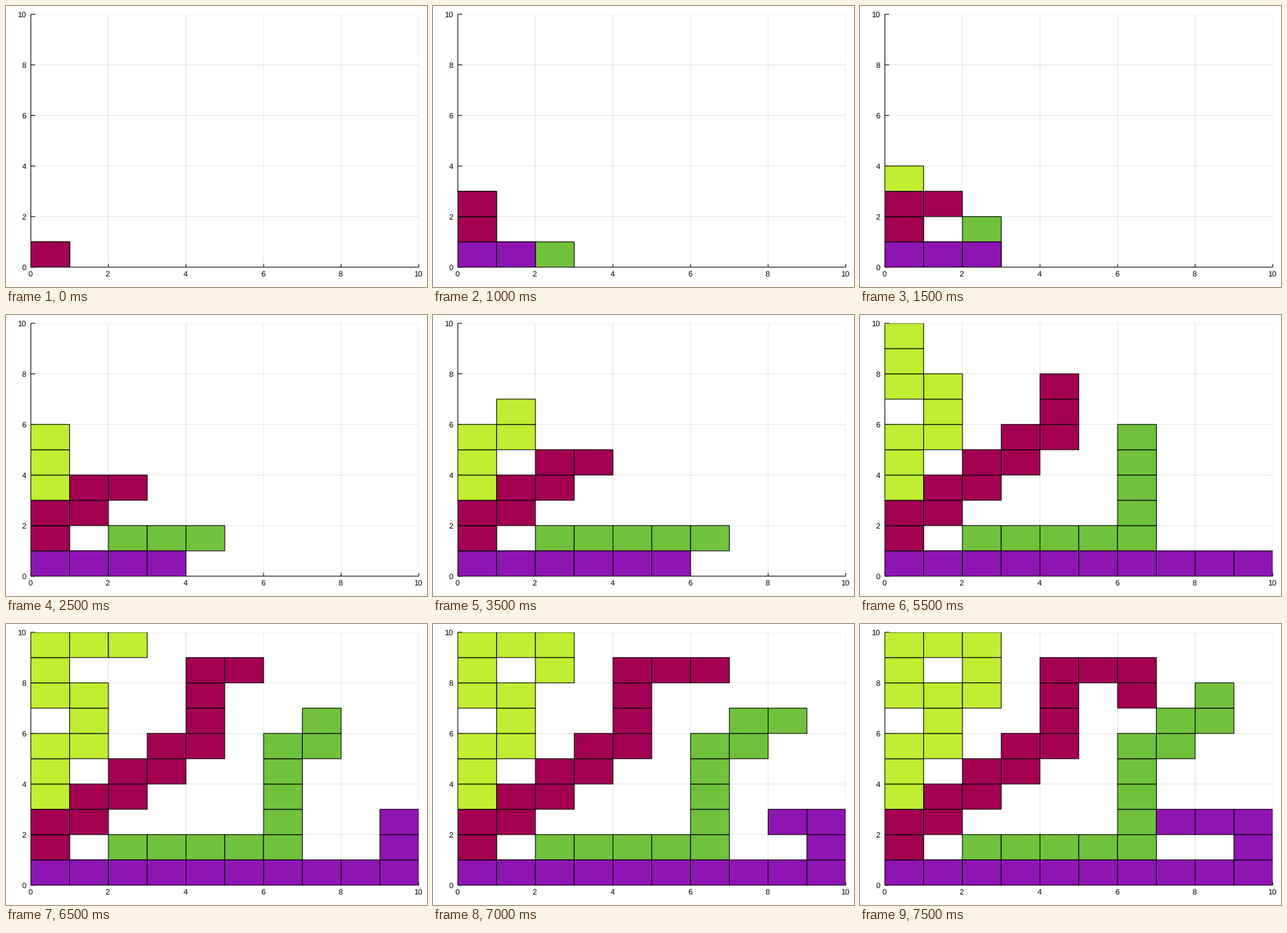
Recreate the animation shown at these times as a matplotlib script. Size 600 px wide and 400 px high, loop 8000 ms.

```python
import matplotlib.pyplot as plt
from matplotlib.animation import FuncAnimation
from matplotlib.patches import Rectangle
from matplotlib.path import Path

plt.rcParams["font.family"] = "Liberation Sans"
plt.rcParams["text.hinting"] = "none"

W, H, DPI = 600, 400, 100
FRAMES, STEP_MS = 16, 500
PX = 72 / DPI
LEFT, RIGHT, TOP, BOTTOM = 35.4, 588.2, 11.8, 371.8
CELL_W, CELL_H = (RIGHT - LEFT) / 10, (BOTTOM - TOP) / 10

MOVES = {"U": (0, 1), "D": (0, -1), "L": (-1, 0), "R": (1, 0), ".": (0, 0)}

# One move per step; later walkers paint over earlier ones.
WALKERS = [
    ("#c0ee31", "UUUUURUULUURRDD"),
    ("#70c23c", "RRURRRRUUUURURU"),
    ("#8f14b4", ".RR.RRRRRRRUULL"),
    ("#a30052", "UURURURURUUURRD"),
]

fig = plt.figure(figsize=(W / DPI, H / DPI), dpi=DPI, facecolor="white")
ax = fig.add_axes([0, 0, 1, 1])
ax.set_xlim(0, W)
ax.set_ylim(H, 0)
ax.axis("off")

plot_area = Path(
    [(LEFT, TOP), (RIGHT, TOP), (RIGHT, BOTTOM), (LEFT, BOTTOM), (LEFT, TOP)],
    closed=True,
)


def px(x):
    return LEFT + x * CELL_W


def py(y):
    return BOTTOM - y * CELL_H


def line(x0, y0, x1, y1, alpha=1.0, clip=False):
    (item,) = ax.plot([x0, x1], [y0, y1], color="black", alpha=alpha, lw=PX,
                      solid_capstyle="butt", snap=False, zorder=1)
    if clip:
        item.set_clip_path(plot_area, ax.transData)
    else:
        item.set_clip_on(False)


def walk(moves):
    x = y = 0
    cells = [(x, y)]
    for m in moves:
        dx, dy = MOVES[m]
        x, y = x + dx, y + dy
        cells.append((x, y))
    return cells


def draw_axes():
    for v in range(0, 11, 2):
        line(px(v), TOP, px(v), BOTTOM, alpha=0.1, clip=True)
        line(LEFT, py(v), RIGHT, py(v), alpha=0.1, clip=True)
    line(LEFT, TOP, LEFT, BOTTOM)
    line(LEFT, BOTTOM, RIGHT, BOTTOM)
    for v in range(0, 11, 2):
        line(px(v), BOTTOM, px(v), BOTTOM - 4.4)
        line(LEFT, py(v), LEFT + 6.2, py(v))
        ax.text(px(v) - 1, 385, str(v), fontsize=8, ha="center", va="baseline")
        ax.text(28.5, py(v) + 4.2, str(v), fontsize=8, ha="right", va="baseline")


def add_cell(x, y, color):
    cell = Rectangle((px(x), py(y + 1)), CELL_W, CELL_H, facecolor=color,
                     edgecolor="black", lw=PX, snap=False, zorder=2)
    ax.add_patch(cell)
    cell.set_clip_path(plot_area, ax.transData)
    return cell


draw_axes()
trails = [(color, walk(moves)) for color, moves in WALKERS]
steps = [[add_cell(*cells[k], color) for color, cells in trails]
         for k in range(FRAMES)]


def update(k):
    for i, cells in enumerate(steps):
        for cell in cells:
            cell.set_visible(i <= k)
    return []


anim = FuncAnimation(fig, update, frames=FRAMES, init_func=lambda: update(0),
                     interval=STEP_MS, repeat=True, repeat_delay=0, blit=False)
plt.show()
```
